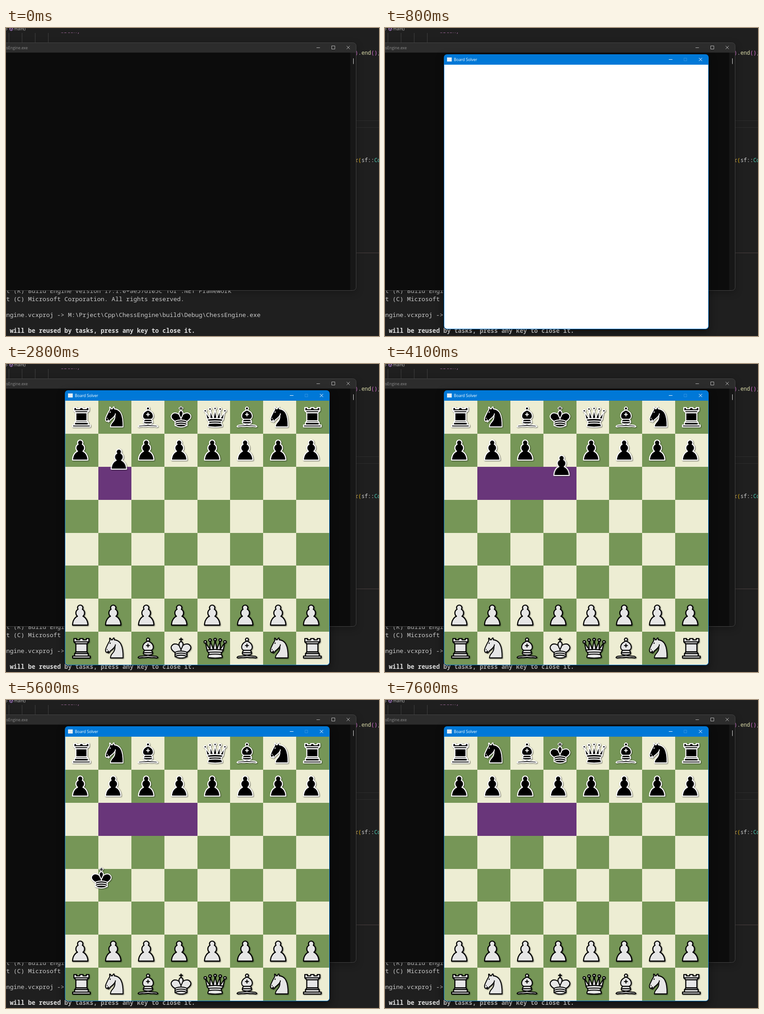
These frames come from a looping animation (824x680 px, 8 s). An HTML page:

```html
<!DOCTYPE html>
<html lang="en">
<head>
<meta charset="utf-8">
<title>Chess board</title>
<style>
  html, body { margin: 0; width: 100%; height: 100%; overflow: hidden; background: #1f1f1f; }
  svg { display: block; width: 824px; height: 680px; }
  text { white-space: pre; }
  .ui { font: 8.6px "Open Sans", "Noto Sans", sans-serif; }
  .code { font: 11.8px "Noto Sans Mono", "DejaVu Sans Mono", monospace; }
  .term { font: 13.383px "Noto Sans Mono", "DejaVu Sans Mono", monospace; fill: #ccc; }
  .icon { fill: none; stroke-width: 1; }
  .shade { fill: #000; filter: blur(9px); }
  .piece { stroke-width: 1.6; stroke-linejoin: round; stroke-linecap: round;
           filter: drop-shadow(1.5px 1.5px 1px rgba(0, 0, 0, .6)); }
  .white { fill: #e6e6e6; stroke: #000; }
  .black { fill: #000; stroke: #fff; }
  .line { fill: none; }
</style>
</head>
<body>
<svg viewBox="0 0 824 680" xmlns="http://www.w3.org/2000/svg">
  <rect width="824" height="680" fill="#1f1f1f"/>

  <!-- editor -->
  <text class="code" x="121" y="11" fill="#a56ca1">break;</text>
  <rect width="824" height="10" fill="#1f1f1f"/>
  <path class="icon" d="M0 0l3 2.5-3 2.5" stroke="#aaa"/>
  <path class="icon" d="M11.500-1l3.500 1.800v3.400l-3.500 1.800-3.500-1.800V.8zM8 .8l3.500 1.700L15 .8M11.500 2.500V6" stroke="#b180d7"/>
  <text class="ui" x="18" y="5" fill="#bbb">main()</text>
  <path class="icon" d="M6.500 11v21M35.500 11v21M64.500 11v21M93.500 11v21" stroke="#404040"/>
  <path class="icon" d="M774 204.500h50M774 219.500h50" stroke="#2d2d2d"/>
  <path class="icon" d="M774 496.500h50" stroke="#4a4040"/>
  <text class="code" x="771" y="59" fill="#d4d4d4"><tspan fill="#da70d6">)</tspan>.<tspan fill="#dcdcaa">end</tspan><tspan fill="#da70d6">()</tspan>;</text>
  <text class="code" x="771" y="296" fill="#d4d4d4"><tspan fill="#dcb45a">r</tspan><tspan fill="#f5c211">(</tspan>sf::<tspan fill="#4ec9b0">Co</tspan></text>
  <g class="term">
    <text x="-7.500" y="585">ft (R) Build Engine version 17.1.0+ae57d105c for .NET Framework</text>
    <text x="-7.500" y="603">ht (C) Microsoft Corporation. All rights reserved.</text>
    <text x="-47.700" y="638">ChessEngine.vcxproj -&gt; M:\Prject\Cpp\ChessEngine\build\Debug\ChessEngine.exe</text>
    <text x="-7.500" y="673" font-weight="bold" fill="#dedede">l will be reused by tasks, press any key to close it.</text>
  </g>

  <!-- console window -->
  <rect class="shade" x="-20" y="38" width="793" height="545" opacity=".3"/>
  <rect x="-20" y="32.500" width="793.500" height="547" rx="7" fill="#171717"/>
  <path d="M0 54.500V32.500h766.500a7 7 0 0 1 7 7v15z" fill="#2c2c2c"/>
  <rect y="54.500" width="760.500" height="524.500" fill="#0c0c0c"/>
  <rect class="icon" x="-20" y="32.500" width="793.500" height="547" rx="7" stroke="#434343"/>
  <text class="ui" x="48" y="47" text-anchor="end" fill="#8c8c8c">ssEngine.exe</text>
  <path class="icon" d="M686 43.500h7.500M719.500 39.500h7v7h-7zM752.500 39.500l7 7m0-7l-7 7" stroke="#b4b4b4"/>
  <path class="icon" d="M767.500 67v12.500" stroke="#ddd"/>

  <!-- game window -->
  <g id="win">
    <rect class="shade" x="130" y="64" width="585" height="607" opacity=".5"/>
    <rect x="130" y="58" width="585" height="607" rx="7" fill="#0078d7"/>
    <path d="M131 81h583v577a6 6 0 0 1-6 6H137a6 6 0 0 1-6-6z" fill="#fff"/>
    <rect x="137" y="65" width="10.500" height="9" fill="#e4edf5"/>
    <text x="152" y="73" fill="#fff" style="font:8.700px 'Open Sans','Noto Sans',sans-serif">Board Solver</text>
    <path class="icon" d="M627 69.500h8M693.500 66l7 7m0-7l-7 7" stroke="#fff"/>
    <path class="icon" d="M660.500 66.500h6v6h-6z" stroke="#2f92e0"/>
    <clipPath id="round"><path d="M131 81h583v577a6 6 0 0 1-6 6H137a6 6 0 0 1-6-6z"/></clipPath>
    <g id="board" clip-path="url(#round)"></g>
  </g>
</svg>

<script>
const LOOP = 8000, CELL = 583 / 8, LEFT = 131, TOP = 81;
const board = document.getElementById('board');
const win = document.getElementById('win');

// fit: x, y, scale x, scale y; body is filled, line is stroked only
const SHAPES = {
  P: { fit: [-.1, 1, 1.47, 1.45],
    body: ['M22.5 9c-2.2 0-4 1.8-4 4 0 .9.3 1.7.8 2.4C17.300 16.500 16 18.600 16 21c0 2 .9 3.800 2.400 5-3 1.100-7.400 5.600-7.400 13.500h23c0-7.900-4.400-12.400-7.400-13.500 1.500-1.200 2.400-3 2.400-5 0-2.400-1.300-4.500-3.300-5.600.5-.7.8-1.500.8-2.400 0-2.200-1.800-4-4-4z'] },
  R: { fit: [3.2, 2.2, 1.44, 1.43],
    body: ['M9 39h27v-3H9z', 'M12 36v-4h21v4z', 'M12.500 32l1.500-2.500h17l1.500 2.500z', 'M14 17h17v12.500H14z',
      'M11 14V9h4v2h5V9h5v2h5V9h4v5l-3 3H14z'], line: 'M11 14h23' },
  N: { fit: [8.7, 4, 1.21, 1.38],
    body: ['M22 10c10.500 1 16.500 8 16 29H15c0-9 10-6.500 8-21',
      'M24 18c.4 2.900-5.500 7.400-8 9-3 2-2.800 4.300-5 4-1-.9 1.400-3 0-3-1 0 .2 1.200-1 2-1 0-4 1-4-4 0-2 6-12 6-12s1.900-1.900 2-3.500c-.7-1-.5-2-.5-3 1-1 3 2.500 3 2.500h2s.8-2 2.500-3c1 0 1 3 1 3'],
    line: 'M9 25.500h.1M14.700 15l-.4.8' },
  B: { fit: [7, 6.7, 1.33, 1.32],
    body: ['M9 36c3.400-1 10.100.4 13.500-2 3.400 2.400 10.100 1 13.500 2 0 0 1.600.5 3 2-.7 1-1.600 1-3 .5-3.400-1-10.100.5-13.500-1-3.400 1.500-10.100 0-13.500 1-1.400.5-2.300.5-3-.5 1.400-1.900 3-2 3-2z',
      'M15 32c2.500 2.500 12.500 2.500 15 0 .5-1.500 0-2 0-2 0-2.500-2.500-4-2.500-4 5.500-1.500 6-11.500-5-15.500-11 4-10.500 14-5 15.500 0 0-2.500 1.500-2.500 4 0 0-.5.5 0 2z',
      'M25 8a2.500 2.500 0 1 1-5 0 2.500 2.500 0 1 1 5 0z'],
    line: 'M17.500 26h10M15 30h15M22.500 15.500v5M20 18h5' },
  K: { fit: [7.5, 6.2, 1.31, 1.31], cross: 'M22.500 11.600V6M20 8h5',
    body: ['M12.500 37c5.500 3.500 14.500 3.500 20 0v-7s9-4.500 6-10.500c-4-6.500-13.500-3.500-16 4V27v-3.500c-2.500-7.500-12-10.500-16-4-3 6 6 10.500 6 10.500z',
      'M22.500 25s4.500-7.500 3-10.500c0 0-1-2.500-3-2.500s-3 2.500-3 2.500c-1.500 3 3 10.500 3 10.500'],
    line: 'M12.500 30c5.500-3 14.500-3 20 0m-20 3.500c5.500-3 14.500-3 20 0m-20 3.500c5.500-3 14.500-3 20 0' },
  Q: { fit: [9.7, 6.6, 1.32, 1.31], balls: [[6, 12], [14, 9], [22.5, 8], [31, 9], [39, 12]],
    body: ['M9 26c8.500-1.500 21-1.500 27 0l2.500-12.500L31 25l-.3-14.100-5.200 13.600-3-14.500-3 14.500-5.200-13.600L14 25 6.500 13.500z',
      'M9 26c0 2 1.500 2 2.500 4 1 1.500 1 1 .5 3.500-1.500 1-1 2.500-1 2.500-1.500 1.500 0 2.500 0 2.500 6.500 1 16.500 1 23 0 0 0 1.500-1 0-2.500 0 0 .5-1.500-1-2.500-.5-2.500-.5-2 .5-3.500 1-2 2.500-2 2.500-4-8.500-1.500-18.500-1.500-27 0z'],
    line: 'M11.500 30c3.500-1 18.500-1 22 0M12 33.500c6-1 15-1 21 0' }
};

function add(parent, tag, attrs = {}) {
  const el = document.createElementNS('http://www.w3.org/2000/svg', tag);
  for (const k in attrs) el.setAttribute(k, attrs[k]);
  return parent.appendChild(el);
}

function square(col, row, fill) {
  const x = Math.round(LEFT + col * CELL), y = Math.round(TOP + row * CELL);
  return add(board, 'rect', {
    x, y, fill,
    width: Math.round(LEFT + (col + 1) * CELL) - x,
    height: Math.round(TOP + (row + 1) * CELL) - y
  });
}

function piece(kind, col, row) {
  const { fit, body, line, cross, balls = [] } = SHAPES[kind];
  const side = row < 4 ? 'black' : 'white';
  const holder = add(board, 'g');
  const spot = add(holder, 'g', { transform: `translate(${LEFT + col * CELL} ${TOP + row * CELL})` });
  const g = add(add(spot, 'g', { class: 'piece ' + side }), 'g', {
    transform: `translate(${fit[0]} ${fit[1]}) scale(${fit[2]} ${fit[3]})`
  });
  if (cross) {
    add(g, 'path', { d: cross, class: 'line', 'stroke-width': side === 'black' ? 3.2 : 1.8 });
    if (side === 'black') add(g, 'path', { d: cross, class: 'line', stroke: '#000', 'stroke-width': 1.2 });
  }
  body.forEach(d => add(g, 'path', { d }));
  balls.forEach(([cx, cy]) => add(g, 'circle', { cx, cy, r: 2 }));
  if (line) add(g, 'path', { d: line, class: 'line' });
  return holder;
}

// steps: [time, properties], each held until the next
function play(el, steps) {
  const frames = steps.map(([t, props]) => ({ offset: t / LOOP, easing: 'steps(1, end)', ...props }));
  frames.push({ offset: 1, ...steps[steps.length - 1][1] });
  el.animate(frames, { duration: LOOP, iterations: Infinity });
}

const show = (el, t) => play(el, [[0, { opacity: 0 }], [t, { opacity: 1 }]]);
const shift = (x, y) => ({ transform: `translate(${x}px, ${y}px)` });

// one place per 100 ms, then back home at `end`
function drag(el, start, end, path) {
  play(el, [[0, shift(0, 0)],
    ...path.map(([x, y], i) => [start + i * 100, shift(x, y)]),
    [end, shift(0, 0)]]);
}

for (let row = 0; row < 8; row++)
  for (let col = 0; col < 8; col++)
    square(col, row, (row + col) % 2 ? '#769657' : '#ededd3');

[2800, 3500, 4100].forEach((t, i) => show(square(i + 1, 2, '#69367a'), t));

const men = {};
[...'RNBKQBNR'].forEach((kind, col) => {
  [[kind, 0], ['P', 1], ['P', 6], [kind, 7]].forEach(([k, row]) => {
    men[col + '-' + row] = piece(k, col, row);
  });
});

const DRAGS = [
  ['1-1', 2800, 3100, [[12.5, 20], [12, 36], [10, 44]]],
  ['2-1', 3500, 3800, [[9, 18], [10, 36], [9, 44]]],
  ['3-1', 4100, 4500, [[7.500, 34], [7, 41], [7, 44]]],
  ['3-0', 5100, 5700, [[3, 8], [-12, 56], [-52, 122], [-102, 178], [-147, 225], [-176, 276]]],
  ['4-0', 6200, 6700, [[20, 30], [72, 110], [88, 215], [-20, 282], [-104, 250]]],
  ['4-6', 7100, 7600, [[6, 7], [-60, -80], [-142, -180], [-30, -223], [106, -150]]]
];
DRAGS.forEach(([id, start, end, path]) => {
  board.appendChild(men[id]);
  drag(men[id], start, end, path);
});

show(board, 1000);

const pose = (opacity, x, y, s) => ({ opacity, transform: `translate(${x}px, ${y}px) scale(${s})` });
win.style.transformOrigin = '422.5px 361.5px';
play(win, [
  [0, pose(0, -2.5, -1.5, .941)],
  [600, pose(.83, -2.5, -1.5, .941)],
  [700, pose(.98, -.5, -.3, .99)],
  [800, pose(1, 0, 0, 1)]
]);
</script>
</body>
</html>
```
